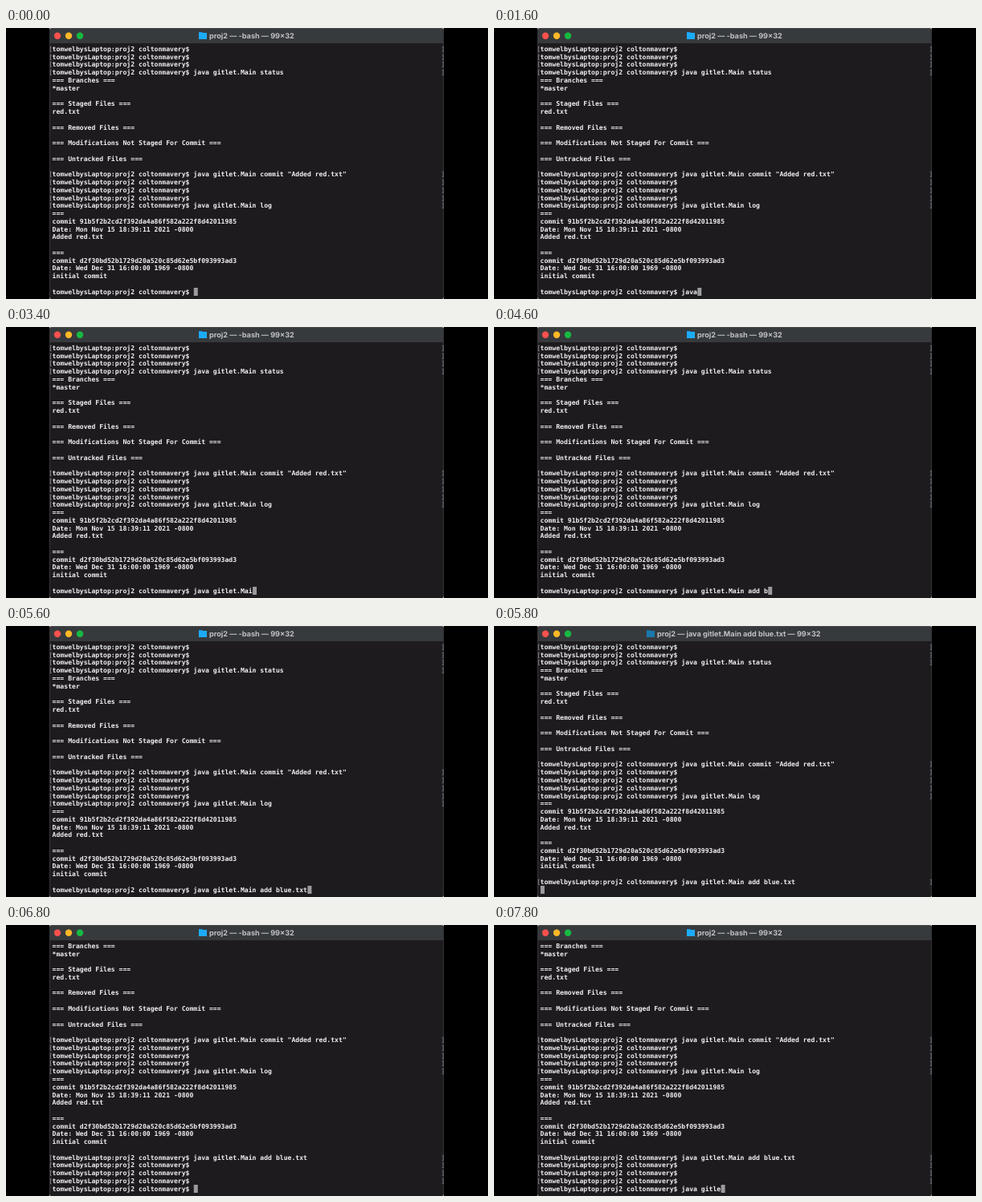
Animation, 600 px wide and 338 px high, one loop 8000 ms. Source, as an HTML page with a canvas:

```html
<!DOCTYPE html>
<html lang="en">
<head>
<meta charset="utf-8">
<title>Terminal</title>
<style>
html, body { margin: 0; width: 100%; height: 100%; overflow: hidden; background: #000; }
canvas { display: block; width: 600px; height: 338px; }
</style>
</head>
<body>
<canvas id="stage" width="600" height="338"></canvas>
<script>
const ctx = document.getElementById('stage').getContext('2d');
const LOOP = 8000, STEP = 200;
const LEFT = 57.6, COL = 4.885, TOP = 28.8, ROW = 9.774, ROWS = 32;
const PROMPT = 'tomwelbysLaptop:proj2 coltonmavery$ ';
const COMMAND = 'java gitlet.Main add blue.txt';

// Lines starting with "$" are shell prompts
const HISTORY = `$
$
$
$java gitlet.Main status
=== Branches ===
*master

=== Staged Files ===
red.txt

=== Removed Files ===

=== Modifications Not Staged For Commit ===

=== Untracked Files ===

$java gitlet.Main commit "Added red.txt"
$
$
$
$java gitlet.Main log
===
commit 91b5f2b2cd2f392da4a86f582a222f8d42011985
Date: Mon Nov 15 18:39:11 2021 -0800
Added red.txt

===
commit d2f30bd52b1729d20a520c85d62e5bf093993ad3
Date: Wed Dec 31 16:00:00 1969 -0800
initial commit
`.split('\n');

const ENTER = 5800, DONE = 6000, RETITLE = 6200;
const clamp = (v, lo, hi) => Math.min(hi, Math.max(lo, v));

// Types the command from index a to b at a steady pace between two times
const typing = (t, start, end, a, b) =>
  Math.floor(a + (b - a) * clamp((t - start) / (end - start), 0, 1));

// Four bursts: "java", " gitle", "t.Main ", then the rest
function firstTyped(t) {
  if (t < 1600) return typing(t, 800, 1600, 0, 4);
  if (t < 2400) return typing(t, 1600, 2200, 4, 10);
  if (t < 3800) return typing(t, 2400, 3800, 10, 17);
  return typing(t, 3800, 5500, 17, 29);
}

function screenLines(t) {
  if (t < ENTER) return [...HISTORY, '$' + COMMAND.slice(0, firstTyped(t))];
  const lines = [...HISTORY, '$' + COMMAND];
  if (t < DONE) return [...lines, ''];
  const blanks = clamp((t - RETITLE) / STEP, 0, 3);
  for (let i = 0; i < blanks; i++) lines.push('$');
  return [...lines, '$' + COMMAND.slice(0, typing(t, 6800, 7800, 0, 10))];
}

function rect(x, y, w, h, color) {
  ctx.fillStyle = color;
  ctx.fillRect(x, y, w, h);
}

function text(s, x, y, color) {
  ctx.fillStyle = color;
  ctx.fillText(s, x, y);
}

function drawWindow() {
  rect(0, 0, 600, 338, '#000');
  rect(54, 0, 491, 338, '#c8c8c8');
  ctx.save();
  ctx.beginPath();
  ctx.roundRect(54, 0, 491, 338, 3);
  ctx.clip();
  rect(54, 0, 491, 338, '#4a494c');
  rect(54.6, 1, 489.8, 337, '#1e1b1f');
  rect(54.6, 1, 489.8, 18, '#373a3d');
  ctx.restore();
  ['#fc514d', '#fdb827', '#18b941'].forEach((color, i) => {
    ctx.fillStyle = color;
    ctx.beginPath();
    ctx.arc(64 + 14 * i, 9.7, 4.2, 0, 7);
    ctx.fill();
  });
}

function drawTitle(busy) {
  const x = busy ? 190 : 240;
  rect(x, 5, 4.5, 3, busy ? '#14699c' : '#1496e6');
  rect(x, 6, 10, 8, busy ? '#1a78ad' : '#1cabf8');
  ctx.font = 'bold 9.15px Inter, sans-serif';
  text(`proj2 — ${busy ? COMMAND : '-bash'} — 99×32`, x + 13, 13, '#c0c1c3');
}

function drawLines(lines) {
  ctx.font = 'bold 8.115px "DejaVu Sans Mono", monospace';
  lines.slice(-ROWS).forEach((line, i) => {
    const y = TOP + i * ROW, last = i === ROWS - 1;
    const s = line.replace(/^\$/, PROMPT);
    text(s, LEFT, y, '#f0f0f0');
    if (last) {
      rect(LEFT + s.length * COL + 0.3, 324, 5, 10, '#9b9a9c');
    } else if (line[0] === '$') {
      text('[', 53.2, y, '#777579');
      text(']', 541.4, y, '#777579');
    }
  });
}

function draw(now) {
  const t = Math.floor(now % LOOP / STEP) * STEP;
  ctx.textRendering = 'geometricPrecision';
  drawWindow();
  drawTitle(t >= ENTER && t < RETITLE);
  drawLines(screenLines(t));
  requestAnimationFrame(draw);
}
requestAnimationFrame(draw);
</script>
</body>
</html>
```
